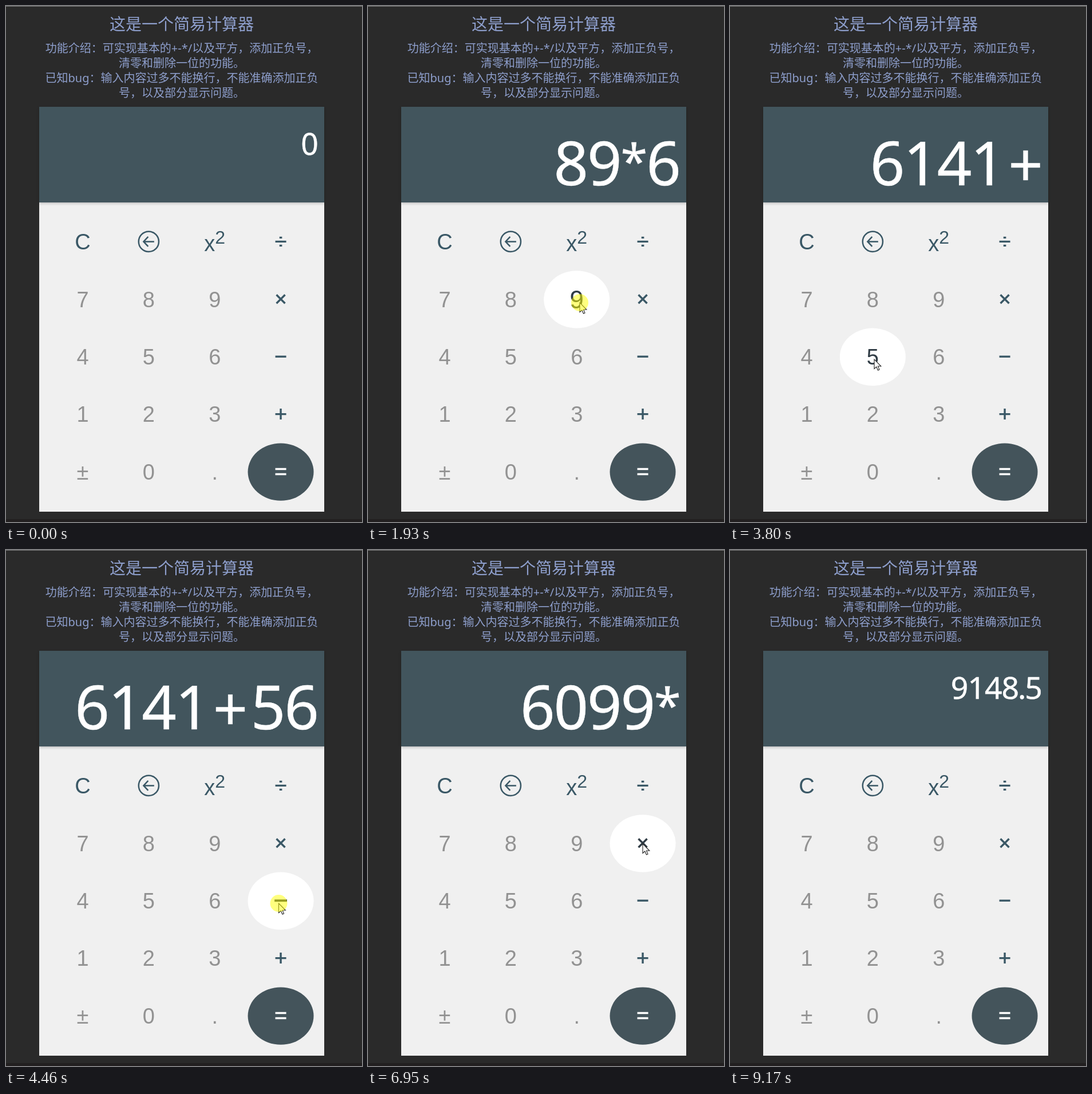
Animation of 622x901 px, one loop 10 s. Source, as an HTML page:

```html
<!DOCTYPE html>
<html lang="zh-CN">
<head>
<meta charset="utf-8">
<title>简易计算器</title>
<style>
  html, body { margin: 0; width: 100%; height: 100%; overflow: hidden; background: #2a2a2a; }
  svg { display: block; }
  text { text-anchor: middle; }
  .intro { fill: #8e9fcd; font: 20px "Noto Sans", "Noto Sans CJK SC", sans-serif; }
  .intro .title { font-size: 28px; }
  .screen { filter: drop-shadow(0 2px 2px #0003); }
  #display { fill: #fff; stroke: #fff; stroke-width: .5; text-anchor: end; font-family: "Noto Sans", "Open Sans", sans-serif; letter-spacing: -.02em; }
  .key { font: 38px "Liberation Sans", Arial, sans-serif; fill: #929292; stroke: #929292; }
  .key text { stroke: none; }
  .key path, .key circle { fill: none; stroke-width: 3.4; }
  .key .ring { stroke-width: 2.5; }
  .key ellipse { fill: none; stroke: none; }
  .key.op { fill: #3a5866; stroke: #3a5866; }
  .key.hover { fill: #303c45; stroke: #303c45; }
  .key.hover ellipse { fill: #fff; }
  .key.equals { fill: #fff; stroke: #fff; }
  .key.equals ellipse { fill: #44545b; }
  .key.active g { transform: scale(1.15); }
</style>
</head>
<body>
<svg width="622" height="901" viewBox="0 0 622 901">
  <rect width="622" height="1" fill="#7c7c7c"/>
  <rect y="896" width="622" height="5" fill="#221f20"/>
  <g class="intro">
    <text class="title" x="307" y="42">这是一个简易计算器</text>
    <text x="307" y="81">功能介绍：可实现基本的+-*/以及平方，添加正负号，</text>
    <text x="307" y="107">清零和删除一位的功能。</text>
    <text x="307" y="133">已知bug：输入内容过多不能换行，不能准确添加正负</text>
    <text x="307" y="159">号，以及部分显示问题。</text>
  </g>
  <rect x="58" y="343" width="498" height="540" fill="#f0f0f0"/>
  <rect class="screen" x="58" y="176" width="498" height="167" fill="#42555d"/>
  <text id="display" x="544.7"></text>
  <g id="keys"></g>
  <path id="cursor" d="M0 0V16.5L3.8 13L6.4 19L9 17.9L6.5 12H11.8Z" fill="#fff" stroke="#222" stroke-width="1.1"/>
  <circle id="press" r="15" fill="#ff0" fill-opacity=".5"/>
</svg>
<script>
const $ = id => document.getElementById(id);
const LOOP = 10000, ENTER = 30, EXIT = 9165, PAUSE = 50;

const icons = {
  'x²': '<text y="16.5">x<tspan dy="-13" font-size="32">2</tspan></text>',
  '←': '<circle class="ring" r="17.6"/><path class="ring" d="M9.5 0H-9M-1 -8.5L-9 0L-1 8.5"/>',
  '÷': '<path d="M-9.5 0H9.5M-2.3 -7H2.3M-2.3 7H2.3"/>',
  '×': '<path d="M-7.5 -7.5L7.5 7.5M-7.5 7.5L7.5 -7.5"/>',
  '−': '<path d="M-9.5 0H9.5"/>',
  '+': '<path d="M-9.5 0H9.5M0 -9.5V9.5"/>',
  '=': '<path d="M-9.5 -4.5H9.5M-9.5 4.5H9.5"/>'
};

const keys = [...'C←²÷789×456−123+±0.='].map((c, i) => {
  const name = c === '²' ? 'x²' : c;
  const x = 134 + i % 4 * 115.35, y = 411.4 + (i >> 2) * 100.4;
  const kind = 'key' + (name === '=' ? ' equals' : icons[name] || name === 'C' ? ' op' : '');
  $('keys').insertAdjacentHTML('beforeend',
    `<g class="${kind}" transform="translate(${x} ${y})"><ellipse cy=".6" rx="57.5" ry="50.2"/>` +
    `<g>${icons[name] || `<text y="13.8">${name}</text>`}</g></g>`);
  return { x, y, el: $('keys').lastChild };
});

// Pointer stops: arrive, press, release, x, y, text shown on release, small type
const stops = [
  [ENTER, ENTER, ENTER - PAUSE, 236, 882, '0', 1],
  [360, 380, 480, 239, 512, '8'],
  [740, 780, 880, 364, 508, '89'],
  [1110, 1240, 1340, 478, 500, '89*'],
  [1600, 1640, 1740, 372, 633, '89*6'],
  [1880, 1910, 2010, 370, 518, '89*69'],
  [2780, 2930, 3045, 487, 783, '6141'],
  [3250, 3390, 3480, 488, 715, '6141+'],
  [3780, 3830, 3930, 252, 617, '6141+5'],
  [4120, 4170, 4270, 362, 617, '6141+56'],
  [4410, 4420, 4538, 476.5, 617, '6141+56-'],
  [4820, 4860, 4960, 368, 517, '6141+56-9', 1],
  [5190, 5230, 5330, 256, 515, '6141+56-98', 1],
  [5650, 5670, 5778, 474, 771, '6099', 1],
  [5780, 5860, 5860, 474, 771],
  [6270, 6270, 6270, 356, 640],
  [6560, 6560, 6560, 510, 570],
  [6780, 6830, 6940, 480, 513, '6099*'],
  [7300, 7340, 7440, 142, 715, '6099*1'],
  [7720, 7770, 7880, 345, 811, '6099*1.'],
  [8240, 8290, 8390, 250, 617, '6099*1.5'],
  [8680, 8720, 8830, 488, 831, '9148.5', 1],
  [8960, 8960, 8970, 487, 820],
  [EXIT, EXIT, EXIT, 595, 858]
];

const span = (s, gap, style = '') => `<tspan dx="${gap}em" style="${style}">${s}</tspan>`;
const gaps = { '+': .07, '-': .04, '.': -.02 };
const styles = { '*': 'font-size:.8em;baseline-shift:.13em', '+': 'baseline-shift:-.03em' };

function format(s) {
  return s.split(/([+*.-])/).map((part, i, all) =>
    part && span(part, gaps[part] || gaps[all[i - 1]] || 0, styles[part])).join('');
}

let shown;
function show([, , , , , s, small]) {
  if (shown === s) return;
  shown = s;
  $('display').setAttribute('y', small ? 260 : 312.5);
  $('display').style.fontSize = small ? '53.5px' : '106px';
  $('display').innerHTML = format(s);
}

function pointer(t) {
  const n = stops.findLastIndex(s => s[0] <= t);
  const [, , release, x, y] = stops[n];
  const next = stops[n + 1], leave = release + PAUSE;
  if (!next || t <= leave || next[0] <= leave) return [x, y];
  const k = (1 - Math.cos(Math.PI * (t - leave) / (next[0] - leave))) / 2;
  return [x + (next[3] - x) * k, y + (next[4] - y) * k];
}

function draw(t) {
  show(stops.findLast(s => s[5] && s[2] <= t));
  const visible = t >= ENTER && t < EXIT;
  const [x, y] = visible ? pointer(t) : [-99, -99];
  const pressed = visible && stops.some(s => s[1] <= t && t < s[2] && s[5]);
  const place = `translate(${x} ${y})`;
  $('cursor').setAttribute('transform', place);
  $('press').setAttribute('transform', place);
  $('press').style.display = pressed ? '' : 'none';
  for (const key of keys) {
    const over = Math.hypot((x - key.x) / 57.5, (y - key.y) / 50) < 1;
    key.el.classList.toggle('hover', over && !key.el.classList.contains('equals'));
    key.el.classList.toggle('active', over && pressed);
  }
}

const start = performance.now();
function tick() {
  draw((performance.now() - start) % LOOP);
  requestAnimationFrame(tick);
}
tick();
</script>
</body>
</html>
```
